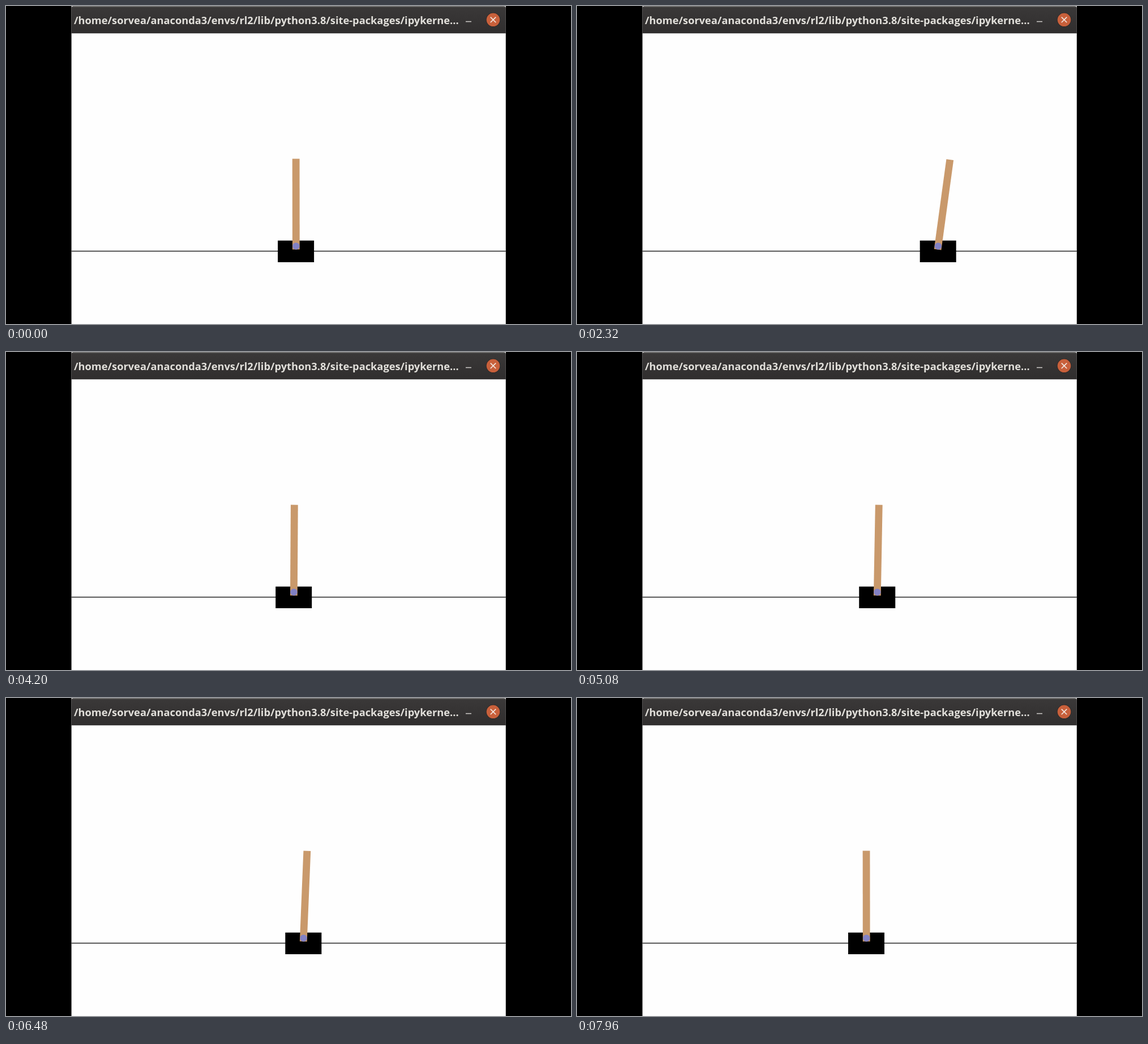
These frames come from a looping animation (998 px wide and 561 px high, 8 s). An HTML page with a canvas:

```html
<!DOCTYPE html>
<html lang="en">
<head>
<meta charset="utf-8">
<title>Cart and pole</title>
<style>
  html, body { margin: 0; width: 100%; height: 100%; overflow: hidden; background: #000; }
  canvas { display: block; width: 100vw; height: 100vh; }
</style>
</head>
<body>
<canvas id="stage" width="998" height="561"></canvas>
<script>
const ctx = document.getElementById('stage').getContext('2d');
const LOOP = 8000, STEP = 40;
const WIN = { x: 115.6, w: 767.2, bar: 48.2 };
const TITLE = '/home/sorvea/anaconda3/envs/rl2/lib/python3.8/site-packages/ipykerne...';

// time (ms), cart centre (px), pole lean (rad)
const POSES = [
  [0, 512.1, -0.001],
  [1040, 543, 0.015],
  [2320, 637.7, 0.136],
  [4200, 508.2, 0.006],
  [5840, 554.4, 0.041],
  [7040, 496.6, 0.033],
  [7960, 511, -0.001]
];

function slope(i, k) {
  const a = POSES[Math.max(i - 1, 0)];
  const b = POSES[Math.min(i + 1, POSES.length - 1)];
  return (b[k] - a[k]) / (b[0] - a[0]);
}

// Cubic Hermite curve through the poses
function valueAt(t, k) {
  let i = 0;
  while (i < POSES.length - 2 && t >= POSES[i + 1][0]) i++;
  const a = POSES[i], b = POSES[i + 1];
  const d = b[0] - a[0];
  const u = Math.min((t - a[0]) / d, 1);
  const u2 = u * u, u3 = u2 * u;
  return (2 * u3 - 3 * u2 + 1) * a[k] + (u3 - 2 * u2 + u) * d * slope(i, k)
       + (3 * u2 - 2 * u3) * b[k] + (u3 - u2) * d * slope(i + 1, k);
}

function rect(color, x, y, w, h) {
  ctx.fillStyle = color;
  ctx.fillRect(x, y, w, h);
}

function disc(color, x, y, r) {
  ctx.fillStyle = color;
  ctx.beginPath();
  ctx.arc(x, y, r, 0, Math.PI * 2);
  ctx.fill();
}

function line(color, width, x1, y1, x2, y2) {
  ctx.strokeStyle = color;
  ctx.lineWidth = width;
  ctx.beginPath();
  ctx.moveTo(x1, y1);
  ctx.lineTo(x2, y2);
  ctx.stroke();
}

function drawWindow() {
  rect('#000', 0, 0, 998, 561);
  rect('#fefefe', WIN.x, 0, WIN.w, 561);

  const shade = ctx.createLinearGradient(0, 0, 0, WIN.bar);
  shade.addColorStop(0, '#8a8987');
  shade.addColorStop(0.05, '#3a3838');
  shade.addColorStop(1, '#302e2e');
  ctx.fillStyle = shade;
  ctx.beginPath();
  ctx.roundRect(WIN.x, 0, WIN.w, WIN.bar, [4, 4, 0, 0]);
  ctx.fill();

  ctx.fillStyle = '#e2e0db';
  ctx.font = 'bold 18.25px "Open Sans", "Noto Sans", sans-serif';
  ctx.fillText(TITLE, 120, 32.3);

  line('#d0cecb', 1.5, 812, 27.5, 822, 27.5);
  disc('#2a2727', 860.5, 24.3, 12.6);
  disc('#c8603b', 860.5, 24.3, 11.8);
  line('#f2e6e0', 1.7, 855.8, 19.6, 865.2, 29);
  line('#f2e6e0', 1.7, 865.2, 19.6, 855.8, 29);
}

function drawCart(x, lean) {
  line('#222', 1.4, WIN.x, 432.5, WIN.x + WIN.w, 432.5);
  rect('#000', x - 32, 413.8, 64, 38.2);

  ctx.save();
  ctx.translate(x + 0.2, 423.6);
  ctx.rotate(lean);
  rect('#c9996b', -6.4, -154, 12.8, 160);
  ctx.restore();
  disc('#8281c4', x + 0.2, 423.6, 6.1);
}

function frame(now) {
  const t = Math.floor((now % LOOP) / STEP) * STEP;
  drawWindow();
  drawCart(valueAt(t, 1), valueAt(t, 2));
  requestAnimationFrame(frame);
}

requestAnimationFrame(frame);
</script>
</body>
</html>
```
